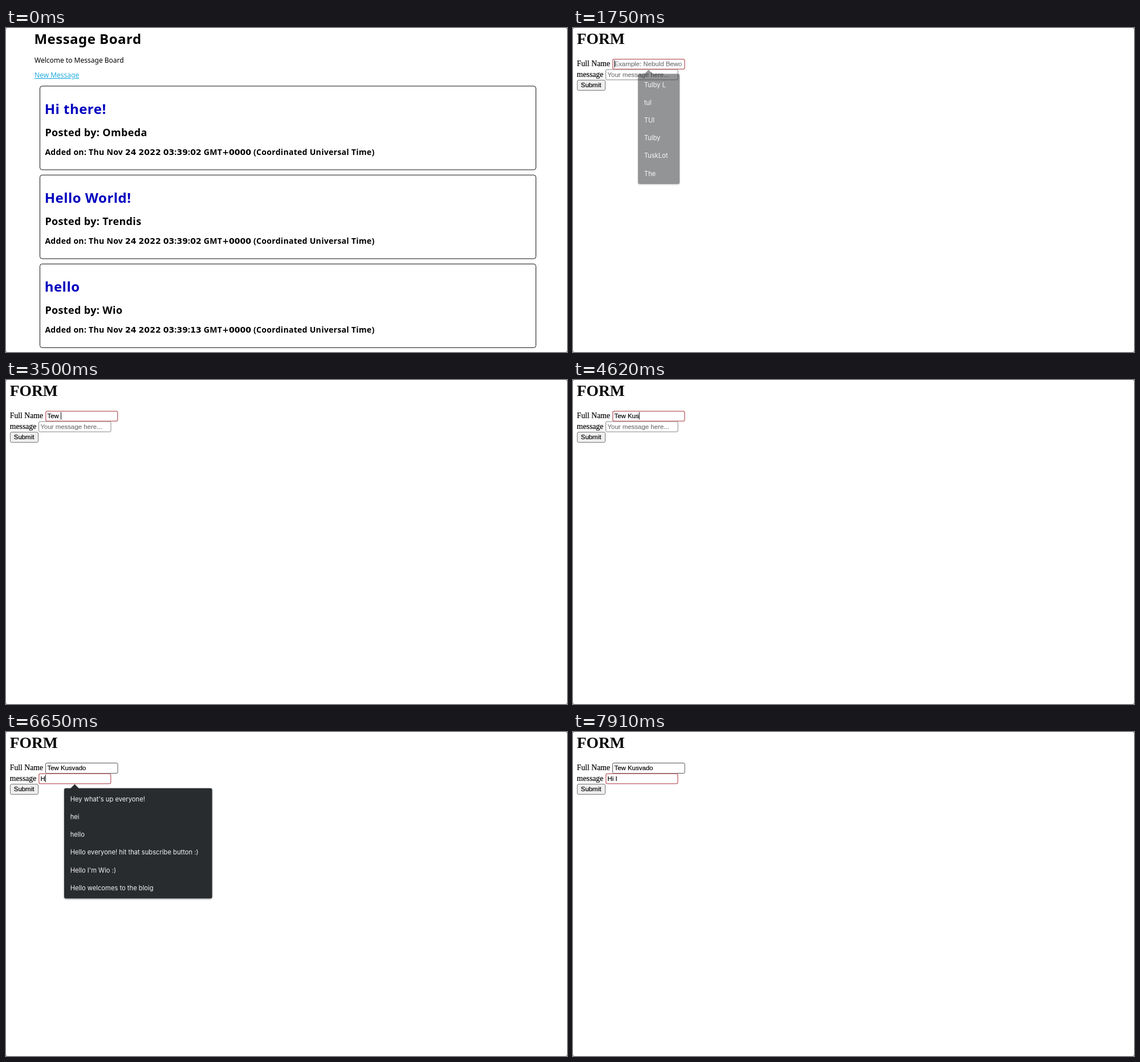
These frames come from a looping animation (984x569 px, 8 s). An HTML page:

```html
<!DOCTYPE html>
<html lang="en">
<head>
<meta charset="utf-8">
<title>Message Board</title>
<style>
  html, body { margin: 0; width: 100%; height: 100%; overflow: hidden; background: #fff; }
  svg { display: block; width: 984px; height: 569px; }
  .board { font-family: "Noto Sans", "Open Sans", sans-serif; font-size: 12px; font-weight: 500; }
  .board .b { font-weight: 700; letter-spacing: .02em; }
  .board .num { font-family: "DejaVu Sans", sans-serif; letter-spacing: 0; }
  .h1 { font-size: 24px; }
  .h2 { font-size: 18px; }
  .h3 { font-size: 14.05px; }
  .title { fill: #0000be; }
  .link { fill: #22ace0; text-decoration: underline; }
  .card { fill: #fff; stroke: #111; }
  .serif { font: 13.72px "Liberation Serif", serif; }
  .head { font: 700 27.5px "Liberation Serif", serif; }
  .ui { font: 11.43px "Liberation Sans", sans-serif; }
  .serif, .ui { stroke: #000; stroke-width: .2px; }
  .box { fill: #fff; }
  .ui.hint { fill: #757575; stroke: #757575; }
  .menu { filter: drop-shadow(0 1px 1.5px rgba(0, 0, 0, .45)); }
  .menu path { fill: #292c2f; }
  .menu text { font: 11.2px Inter, "Open Sans", sans-serif; fill: #f4f4f4; }
</style>
</head>
<body>
<svg id="stage" viewBox="0 0 984 569" xmlns="http://www.w3.org/2000/svg"></svg>
<script>
const LOOP = 8000, BLINK = 490, ROW = 18.7;
const FORM_AT = 910, FOCUS_NAME = 1470, CLICK_NAME = 1750, FOCUS_MSG = 5880;

const posts = [
  ["Hi there!", "Ombeda", "03:39:02"],
  ["Hello World!", "Trendis", "03:39:02"],
  ["hello", "Wio", "03:39:13"]
];
const nameItems = ["Tulby L", "tul", "TUl", "Tulby", "TuskLot", "The"];
const msgItems = ["Hey what's up everyone!", "hei", "hello",
  "Hello everyone! hit that subscribe button :)", "Hello I'm Wio :)", "Hello welcomes to the bloig"];

const NS = "http://www.w3.org/2000/svg";
function el(parent, tag, attrs, text) {
  const e = document.createElementNS(NS, tag);
  for (const k in attrs) e.setAttribute(k, attrs[k]);
  if (text !== undefined) e.textContent = text;
  parent.appendChild(e);
  return e;
}
const label = (parent, x, y, cls, text) => el(parent, "text", { x, y, class: cls }, text);
const show = (e, on) => e.setAttribute("visibility", on ? "visible" : "hidden");

const stage = document.getElementById("stage");

// Board page
const board = el(stage, "g", { class: "board" });
label(board, 49.5, 27.5, "b h1", "Message Board");
label(board, 50, 60.5, "", "Welcome to Message Board");
label(board, 50, 87, "link", "New Message");
posts.forEach(([title, author, time], i) => {
  const g = el(board, "g", { transform: `translate(0 ${156.2 * i})` });
  el(g, "rect", { x: 59.5, y: 102, width: 870, height: 147, rx: 4, class: "card" });
  label(g, 67.7, 151, "b h1 title", title);
  label(g, 68.4, 190, "b h2", "Posted by: " + author);
  const line = label(g, 68.4, 222.5, "b h3", "");
  const stamp = `Added on: Thu Nov 24 2022 ${time} GMT+0000 (Coordinated Universal Time)`;
  for (const part of stamp.split(/([+\d]+)/))
    el(line, "tspan", /\d/.test(part) ? { class: "num" } : {}, part);
});

// Form page
const form = el(stage, "g", {});
label(form, 6.8, 28.3, "head", "FORM");
label(form, 6.8, 67, "serif", "Full Name");
label(form, 6.8, 85.7, "serif", "message");
el(form, "rect", { x: 7.5, y: 91.5, width: 49, height: 18, rx: 2.5, fill: "#efefef", stroke: "#767676" });
label(form, 13.8, 104.3, "ui", "Submit");

function field(x, y, hint, value, keys) {
  const base = y + 12.6;
  return {
    x, y, value, keys,
    box: el(form, "rect", { x, y, width: 126.5, height: 18, rx: 2, class: "box" }),
    hint: label(form, x + 3, base, "ui hint", hint),
    text: label(form, x + 3, base, "ui", "")
  };
}
const nameField = field(69.5, 54.5, "Example: Nebuld Bewo", "Tew Kusvado",
  [2730, 2940, 3080, 3500, 3780, 4130, 4620, 4900, 5110, 5390, 5460]);
const msgField = field(57.5, 73, "Your message here...", "Hi I",
  [6650, 7000, 7140, 7420]);
const ring = el(form, "rect", { width: 126, height: 17.5, rx: 2.5, fill: "none", stroke: "#c4757a", "stroke-width": 1.5 });
const caret = el(form, "rect", { width: 1, height: 13, fill: "#000" });
const status = el(form, "rect", { x: 0, y: 568, width: 228, height: 1, fill: "#e4e4e4" });

// Suggestion menus: a rounded panel with a pointer on top
function menu(x, y, width, items) {
  const g = el(form, "g", { class: "menu", transform: `translate(${x} ${y})` });
  const h = 31.1 * items.length + 6.9, r = 3;
  el(g, "path", { d: `M${r} 0H11.5L18.5 -7L25.5 0H${width - r}q${r} 0 ${r} ${r}V${h - r}` +
    `q0 ${r} ${-r} ${r}H${r}q${-r} 0 ${-r} ${-r}V${r}q0 ${-r} ${r} ${-r}z` });
  items.forEach((s, i) => label(g, 10.7, 23.5 + 31.1 * i, "", s));
  return g;
}
const menus = [
  { g: menu(114, 80.5, 73, nameItems), from: CLICK_NAME, to: 3080, fade: 70 },
  { g: menu(102, 98.7, 259.5, msgItems), from: 6650, to: 7000, fade: 0 },
  { g: menu(102, 98.7, 124, ["Hi everyone! :)"]), from: 7000, to: 7420, fade: 0 }
];

// Rounded window corners
el(stage, "path", { fill: "#555", "fill-rule": "evenodd",
  d: "M0 0H984V569H0zM2.5 0Q0 0 0 2.5V566.5Q0 569 2.5 569H981.5Q984 569 984 566.5V2.5Q984 0 981.5 0z" });

const resets = [FOCUS_NAME, CLICK_NAME, ...nameField.keys, FOCUS_MSG, ...msgField.keys];

function typeInto(f, t) {
  const n = f.keys.filter(k => k <= t).length;
  const s = f.value.slice(0, n).replace(/ /g, "\u00a0");
  if (f.text.textContent !== s) f.text.textContent = s;
  show(f.hint, t >= FORM_AT && n === 0);
}

function draw(t) {
  const onForm = t >= FORM_AT;
  show(board, !onForm);
  show(form, onForm);
  typeInto(nameField, t);
  typeInto(msgField, t);

  const focus = t >= FOCUS_MSG ? msgField : t >= FOCUS_NAME ? nameField : null;
  nameField.box.setAttribute("stroke", !focus ? "#858585" : focus === nameField ? "none" : "#555");
  msgField.box.setAttribute("stroke", !focus ? "#555" : focus === msgField ? "none" : "#858585");
  show(status, onForm && !focus);
  show(ring, !!focus);

  let lit = false;
  if (focus) {
    ring.setAttribute("x", focus.x + .25);
    ring.setAttribute("y", focus.y + .25);
    const last = resets.filter(k => k <= t).pop();
    lit = Math.floor((t - last) / BLINK) % 2 === 0;
    const len = focus.text.textContent ? focus.text.getComputedTextLength() : 0;
    caret.setAttribute("x", focus.x + 3 + len);
    caret.setAttribute("y", focus === nameField ? 56.5 : 56.5 + ROW);
  }
  show(caret, lit);

  for (const m of menus) {
    const on = t >= m.from && t < m.to;
    show(m.g, on);
    const edge = on && (t < m.from + m.fade || t >= m.to - m.fade);
    m.g.setAttribute("opacity", edge ? .5 : 1);
  }
}

const start = performance.now();
function tick() {
  draw((performance.now() - start) % LOOP);
  requestAnimationFrame(tick);
}
tick();
</script>
</body>
</html>
```
